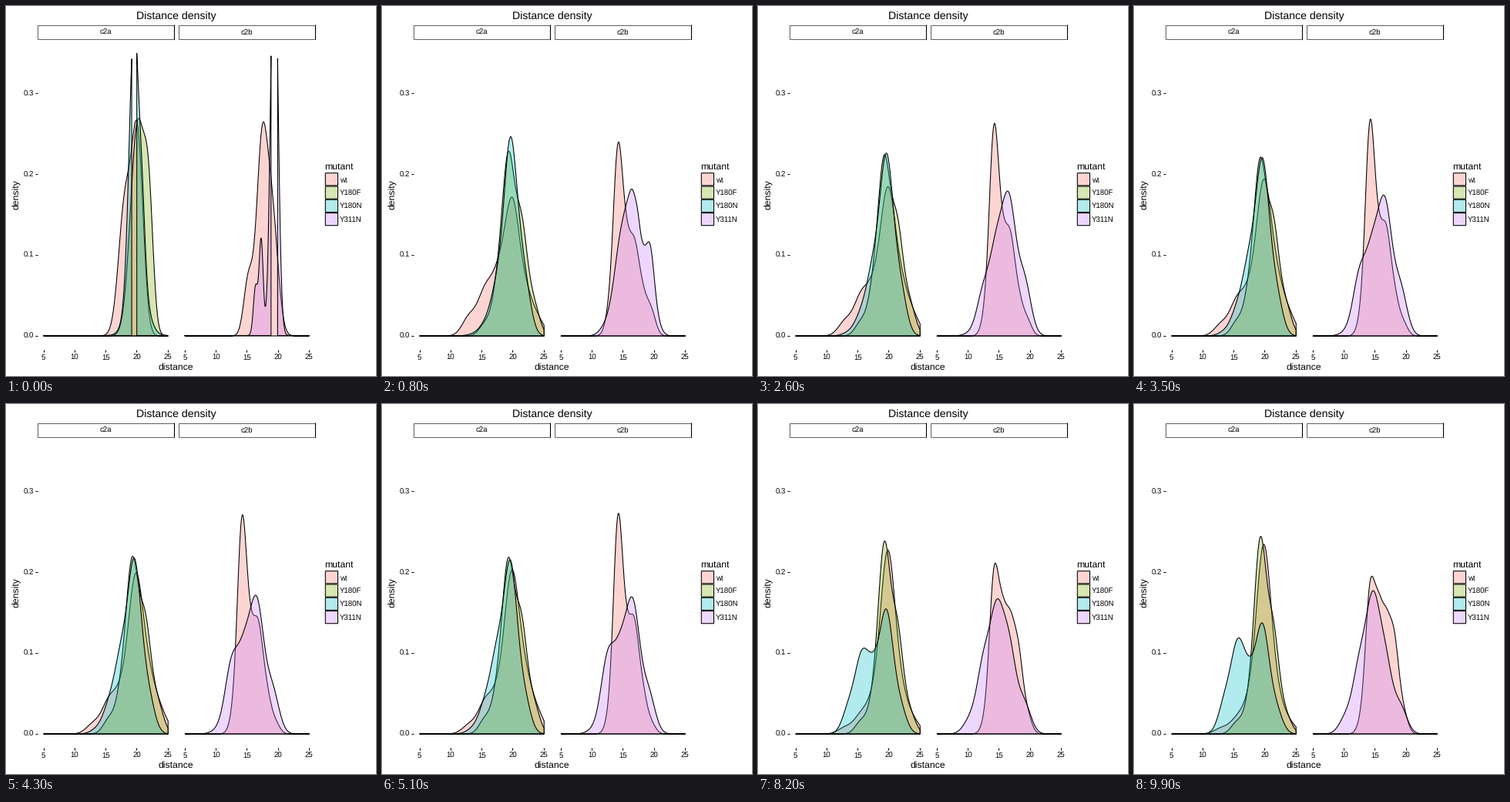
Animation, 480 px wide and 480 px high, one loop 10 s. Source, as a matplotlib script:

```python
import numpy as np
import matplotlib.pyplot as plt
from matplotlib.animation import FuncAnimation
from matplotlib.collections import PolyCollection
from matplotlib.colors import to_rgba
from matplotlib.patches import Rectangle

SIZE, DPI = 480, 80
PX = 72 / DPI                # points per pixel
FRAMES, INTERVAL = 100, 100
LINE = 1.07 * PX
Y_MAX = 0.35                 # densities above this limit are dropped
X_UNIT, Y_UNIT, BASE = 8.06, 1046.7, 427.5
PANELS = {"c2a": 40.5, "c2b": 223.8}
PANEL_W = 177.2
COLORS = {"wt": "#F8766D", "Y180F": "#7CAE00",
          "Y180N": "#00BFC4", "Y311N": "#C77CFF"}
ALPHA = 0.3

# Sample counts: first batch, then early, middle and late in the run.
KEYS = np.array([1, 18, 52, 100])

xs = np.linspace(5, 25, 512)


def bump(centre, spread, height):
    return height * np.exp(-((xs - centre) / spread) ** 2 / 2)


class Curve:
    """Density of one mutant, accumulated over the run.

    first: bumps (centre, spread, height) of the first batch
    states: {centre: heights early, middle, late}, all of one spread
    """

    def __init__(self, panel, name, first, spread, states):
        self.panel, self.name = panel, name
        self.keys = [sum(bump(*b) for b in first)]
        for i in range(len(KEYS) - 1):
            self.keys.append(sum(bump(c, spread, h[i])
                                 for c, h in states.items()))

    def at(self, n):
        """Running average: n * density grows linearly between keys."""
        i = min(np.searchsorted(KEYS, n, side="right"), len(KEYS) - 1)
        a, b = KEYS[i - 1], KEYS[i]
        w = b * (n - a) / (n * (b - a))
        return (1 - w) * self.keys[i - 1] + w * self.keys[i]


CURVES = [
    Curve("c2a", "wt", [(18.1, 1.05, .165), (20.1, .9, .235)], 1.15, {
        13: (.025, .011, .007), 15.5: (.054, .036, .017),
        17.6: (.06, .042, .035), 19.8: (.147, .185, .222),
        21.9: (.05, .06, .038), 23.9: (.02, .023, .012)}),
    Curve("c2a", "Y180F", [(20.1, 1.15, .262), (21.9, .72, .135)], .95, {
        15.5: (.015, .018, .014), 17.6: (.06, .05, .035),
        19.25: (.205, .195, .225), 21.3: (.125, .13, .12),
        23.3: (.04, .035, .022)}),
    Curve("c2a", "Y180N",
          [(19.55, .75, .3), (20.1, 1.35, .09), (20.9, .5, .07)], 1.05, {
              13.6: (.002, .006, .04), 15.6: (.014, .035, .1),
              17.5: (.06, .09, .06), 19.6: (.22, .197, .125),
              21.7: (.075, .045, .03)}),
    Curve("c2b", "wt",
          [(15.2, .75, .07), (17.35, .87, .225), (19, .95, .145)], .73, {
              12.9: (.03, .02, .015), 14.15: (.228, .25, .162),
              15.5: (.095, .095, .125), 16.8: (.09, .115, .11),
              18.1: (.035, .045, .1), 19.5: (.025, .012, .025)}),
    Curve("c2b", "Y311N",
          [(16.4, .35, .06), (17.3, .33, .118), (19.42, .57, .53)], 1.08, {
              10.3: (0, .005, .02), 12.5: (.015, .09, .08),
              14.6: (.11, .09, .15), 16.6: (.16, .147, .085),
              19: (.085, .05, .033)}),
]


def px_x(panel, x):
    return PANELS[panel] + X_UNIT * (np.asarray(x) - 4)


def px_y(d):
    return BASE - Y_UNIT * np.asarray(d)


def areas(panel, d):
    """One closed polygon for each run of values inside the y limit."""
    idx = np.flatnonzero(d <= Y_MAX)
    polys = []
    for run in np.split(idx, np.flatnonzero(np.diff(idx) > 1) + 1):
        x, y = px_x(panel, xs[run]), px_y(d[run])
        polys.append(np.column_stack([np.r_[x[0], x, x[-1]],
                                      np.r_[BASE, y, BASE]]))
    return polys


plt.rcParams.update({"font.family": "Liberation Sans",
                     "text.hinting": "none"})
fig = plt.figure(figsize=(SIZE / DPI, SIZE / DPI), dpi=DPI, facecolor="white")
ax = fig.add_axes([0, 0, 1, 1])
ax.set(xlim=(0, SIZE), ylim=(SIZE, 0))
ax.axis("off")


def label(x, y, s, size=9.6, ha="center", **kw):
    ax.text(x, y, s, fontsize=size * PX, ha=ha, va="baseline",
            color="black", **kw)


def box(x, y, w, h, fill="white", edge="black", **kw):
    ax.add_patch(Rectangle((x, y), w, h, facecolor=fill, edgecolor=edge,
                           linewidth=LINE, **kw))


def line(x, y):
    ax.plot(x, y, color="black", lw=LINE, solid_capstyle="butt")


label(221, 17, "Distance density", 14.2)
label(220.5, 472, "distance", 12.3)
label(16.6, 244.5, "density", 12.3, rotation=90, rotation_mode="anchor")

for name, left in PANELS.items():
    right = left + PANEL_W
    box(left, 24.5, PANEL_W, 18, edge="#666666")
    line([right, right], [24, 43])
    label(left + PANEL_W / 2, 36.6, name)
    for v in range(5, 26, 5):
        x = float(px_x(name, v))
        line([x, x], [445.5, 448.5])
        label(x, 458.5, str(v))

for v in (0, 0.1, 0.2, 0.3):
    y = float(px_y(v))
    line([37.5, 40.5], [y, y])
    label(36, y + 3.4, f"{v:.1f}", ha="right")

label(413.4, 212, "mutant", 12.2, ha="left")
for i, (name, color) in enumerate(COLORS.items()):
    top = 216.2 + 17.28 * i
    box(414.3, top + 0.5, 16.2, 16.2, to_rgba(color, ALPHA), snap=False)
    label(433, top + 12.4, name, ha="left")

shapes = []
for curve in CURVES:
    area = PolyCollection([], facecolors=[to_rgba(COLORS[curve.name], ALPHA)],
                          edgecolors="black", linewidths=LINE,
                          joinstyle="round")
    ax.add_collection(area, autolim=False)
    shapes.append(area)


def update(frame):
    for area, curve in zip(shapes, CURVES):
        area.set_verts(areas(curve.panel, curve.at(frame + 1)))
    return shapes


anim = FuncAnimation(fig, update, frames=FRAMES, interval=INTERVAL,
                     repeat=True, repeat_delay=0)
plt.show()
```
